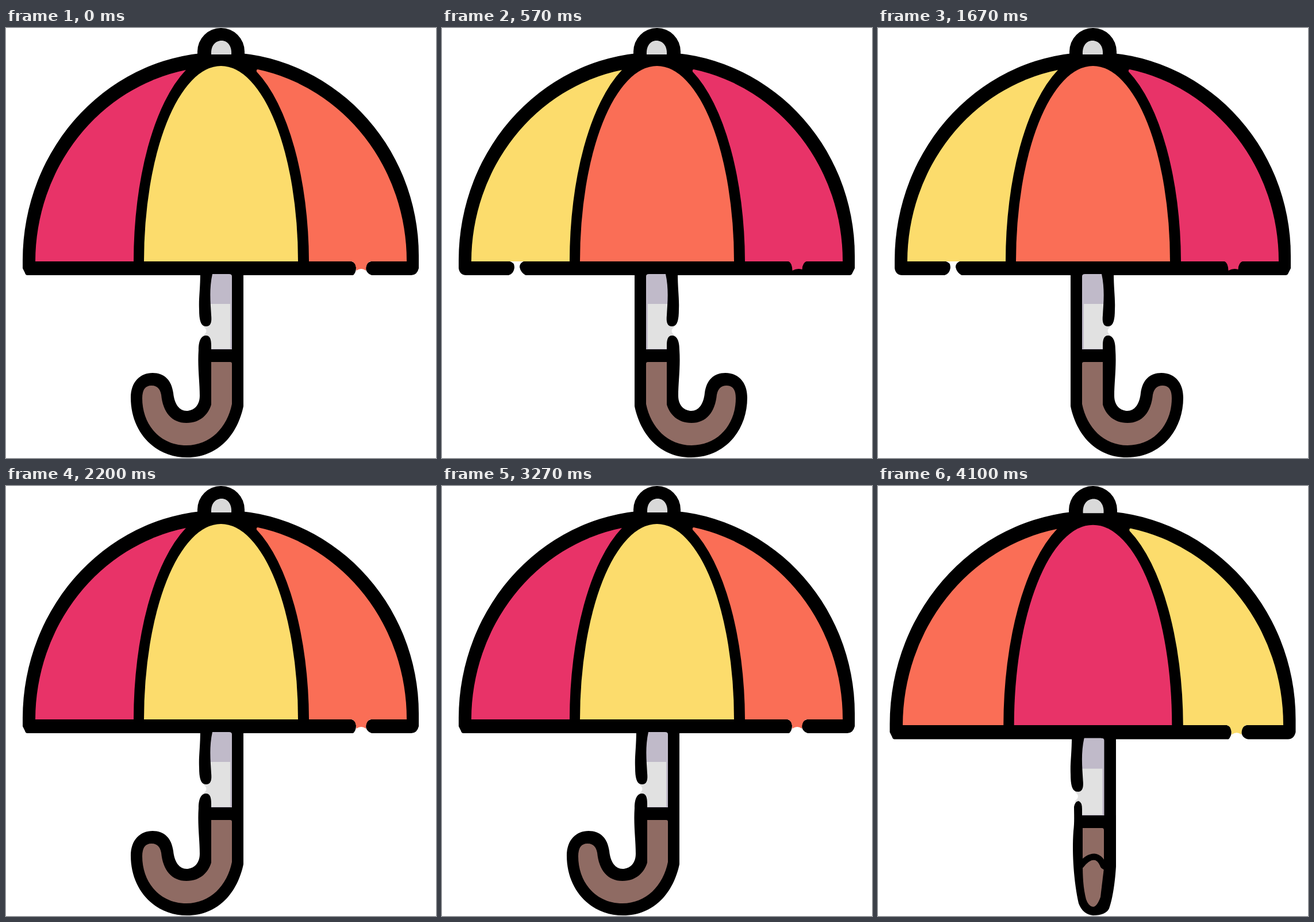
An HTML page for the animation above (4.33 s loop, 748 by 748 pixels).

```html
<!DOCTYPE html>
<html lang="en">
<head>
<meta charset="utf-8">
<title>Spinning umbrella</title>
<style>
  html, body { margin: 0; width: 100%; height: 100%; overflow: hidden; background: #fff; }
  svg { display: block; width: 100%; height: 100%; }
  .wood { fill: #8f6b63; }
  .steel { fill: #e1e1e1; }
  .shade { fill: #c0bac9; }
  .white { fill: #fff; }
  .left { fill: var(--left); }
  .middle { fill: var(--middle); }
  .right { fill: var(--right); }
</style>
</head>
<body>
<svg viewBox="0 0 748 748">
  <g id="canopy">
    <path id="dome"/>
    <path class="left" d="M51 406A323 340 0 0 1 313 73A152 364 0 0 0 222 406Z"/>
    <path class="middle" d="M240 406A134 340 0 0 1 508 406Z"/>
    <path class="right" d="M697 406A323 340 0 0 0 438 72Q435 72 436 76A152 364 0 0 1 527 406Z"/>
    <g id="openGap">
      <path class="white" d="M601 406Q609 408 609 417Q609 426 603 431H640Q626 428 626 417Q626 408 635 406Z"/>
      <path class="right" d="M601 405.5Q609 408 609.5 422Q618 416 626 422Q626 408 635 405.5Z"/>
    </g>
    <g id="sideGap">
      <path class="white" d="M118 406Q126 408 126 416Q125 430 110 431H147Q137 426 135 416Q135 409 142 406Z"/>
      <path class="right" d="M602 405.5Q609 408 609.5 422Q618 417 626.5 420Q627 408 635 405.5Z"/>
    </g>
  </g>
  <g id="stick">
    <g id="shaft">
      <path d="M333 46V41A41 41 0 0 1 415 41V46Z"/>
      <path fill="#d9d9d9" d="M357 46C356 31 364 22 375 22S393 32 392 46Z"/>
      <path class="shade" d="M355 428H394V561H355Z"/>
      <path class="steel" d="M355 480H390V558H355V550L343 535Q354 527 343 519L355 505Z"/>
      <path d="M338 425C338 455 335 470 336 490C336 509 339 519 348 519C357 519 358 510 357 500C356 480 353 455 359 428L362 425Z"/>
      <path d="M388 425H413V600H393V432Q393 428 388 428Z"/>
    </g>
    <g id="hook">
      <path d="M413 559V658C403 706 370 747 315 747C258 747 217 702 217 643C217 615 234 600 255 600C275 600 288 612 291 635C293 655 302 666 314 666C326 666 337 657 337 640C337 615 333 590 335 560C335 545 339 535 348 535C355 535 357 542 357 552V559Z"/>
      <path class="wood" d="M357 581H390Q393 581 393 584V654C385 695 355 726 314 726C268 726 237 690 237 644Q237 622 253 622Q267 622 270 638C273 668 288 687 314 687C338 687 352 672 357 655Z"/>
    </g>
    <g id="edge">
      <path d="M414 573V662C412 695 407 722 402 735Q396 747 374 747Q356 745 349 726C341 690 337 640 340 600C342 585 341 570 341 558Q343 548 349 548Q355 550 355 562V573Z"/>
      <path class="wood" d="M356 595H390Q393 595 393 599V665L387 715Q381 732 374 732Q366 731 362 719C357 700 356 680 356 655Z"/>
      <path id="nearTip" fill="none" stroke="#000" stroke-width="11" d="M352 661Q364 645 376 645Q386 646 391 658Q392 662 397 663"/>
    </g>
  </g>
</svg>
<script>
const PINK = '#e83368', YELLOW = '#fcdc6c', ORANGE = '#fa6e56';
const LOOP = 4330;
const STARTS = [0, 300, 570, 830, 1100, 1400, 1670, 1930,
                2200, 2500, 2770, 3030, 3270, 3570, 3830, 4100];
const POSES = [
  { colors: [PINK, YELLOW, ORANGE], hook: true },
  { colors: [ORANGE, PINK, YELLOW] },
  { colors: [YELLOW, ORANGE, PINK], hook: true, mirrored: true },
  { colors: [ORANGE, PINK, YELLOW], tip: true },
];
const ARCH = 'M29 404A345 362 0 0 1 374 42A344 354 0 0 1 718 396V418';
const ENDS = {
  plain: 'Q715 430 705 430H37Q34 430 33 426L29 418Z',
  mirrored: 'L713 428Q712 430 709 430H42Q31 430 29 418Z',
};
const $ = id => document.getElementById(id);
const show = (id, on) => $(id).setAttribute('display', on ? 'inline' : 'none');
let current;

function draw({ colors, hook, mirrored, tip }) {
  ['left', 'middle', 'right'].forEach((side, i) =>
    document.documentElement.style.setProperty('--' + side, colors[i]));
  const size = hook ? '' : 'translate(374 0) scale(1.0247) translate(-374 0)';
  $('canopy').setAttribute('transform', size);
  $('shaft').setAttribute('transform', size);
  $('stick').setAttribute('transform', mirrored ? 'translate(748 0) scale(-1 1)' : '');
  $('dome').setAttribute('d', ARCH + (mirrored ? ENDS.mirrored : ENDS.plain));
  show('hook', hook);
  show('edge', !hook);
  show('nearTip', tip);
  show('openGap', !mirrored);
  show('sideGap', mirrored);
}

function tick() {
  const time = performance.now() % LOOP;
  const pose = POSES[STARTS.findLastIndex(start => start <= time) % POSES.length];
  if (pose !== current) draw(current = pose);
  requestAnimationFrame(tick);
}
tick();
</script>
</body>
</html>
```
